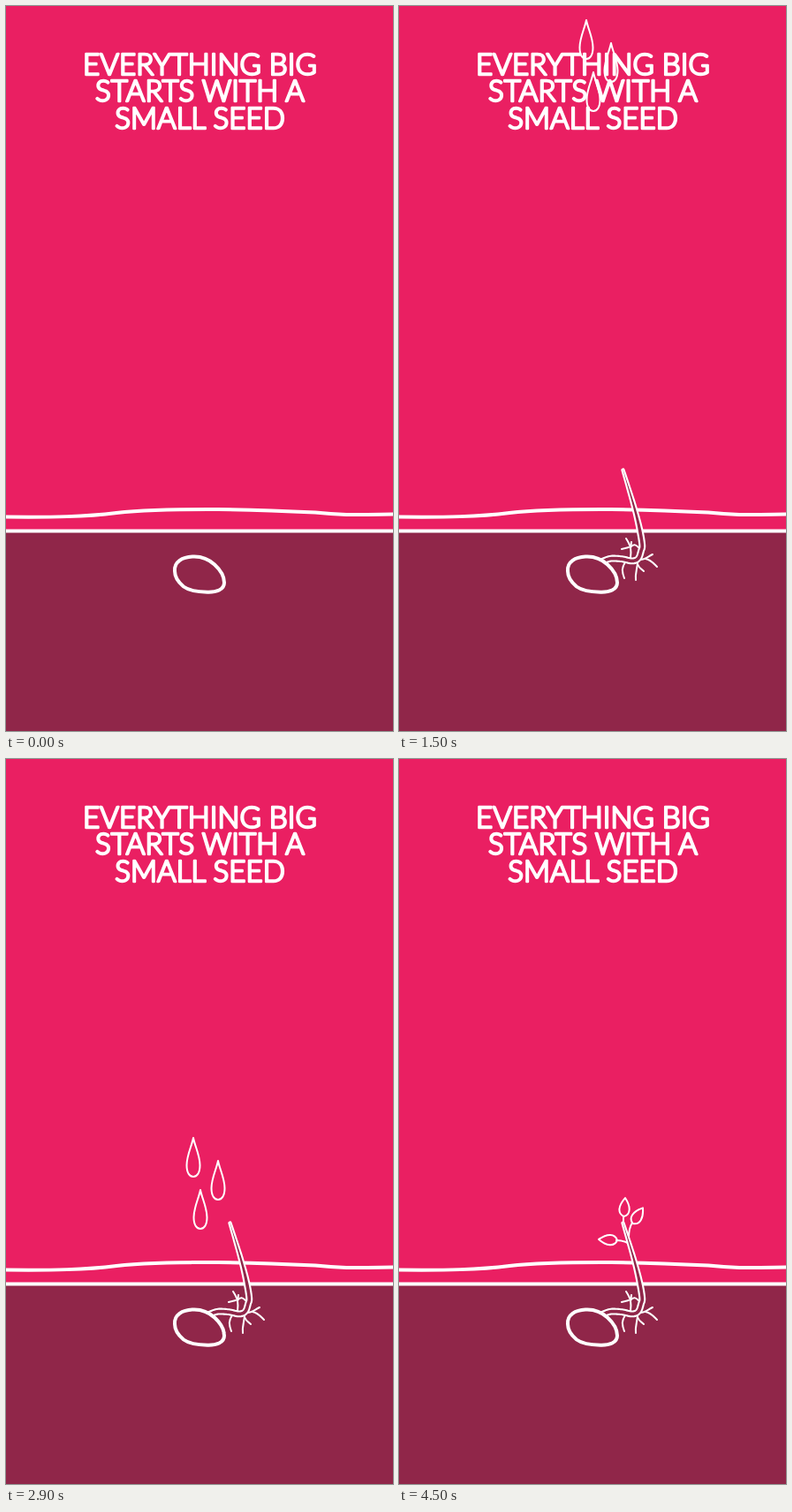
Recreate the animation shown at these times as an HTML page. Size 438 by 821 pixels, loop 4600 ms.

```html
<!DOCTYPE html>
<html lang="en">
<head>
<meta charset="utf-8">
<title>Small seed</title>
<style>
  html, body { margin: 0; width: 100%; height: 100%; overflow: hidden; background: #ea1f62; }
  svg { display: block; width: 100vw; height: 100vh; }
  .line { fill: none; stroke: #fff; stroke-linecap: round; stroke-linejoin: round; }
  .thick { stroke-width: 4; }
  .thin { stroke-width: 2; }
  text {
    font: 300 33px Lato, "Open Sans", sans-serif;
    letter-spacing: 0.1px;
    text-anchor: middle;
    fill: #fff; stroke: #fff; stroke-width: 2.5; stroke-linejoin: round;
  }
</style>
</head>
<body>
<svg viewBox="0 0 438 821" preserveAspectRatio="none">
  <defs>
    <path id="drop" d="M0 0C2 10 7.5 20 7.5 31C7.5 40 4 44 0 44C-4 44 -7.5 40 -7.5 31C-7.5 20 -2 10 0 0Z"/>
    <path id="leaf" vector-effect="non-scaling-stroke" d="M0 0C-8 -3 -7 -12 0 -21C7 -12 8 -3 0 0Z"/>
  </defs>
  <rect width="438" height="821" fill="#ea1f62"/>
  <g id="rain" class="line thin">
    <use href="#drop" x="212"/>
    <use href="#drop" x="240" y="26"/>
    <use href="#drop" x="220" y="59"/>
  </g>
  <text x="219.5" y="78">EVERYTHING BIG</text>
  <text x="219.5" y="108">STARTS WITH A</text>
  <text x="219.5" y="138.5">SMALL SEED</text>
  <path class="line thick" style="fill:#ea1f62" d="M-5 578.5C55 579 90 578.5 125 574C165 569.5 210 570 240 570C290 570.5 330 572.5 350 573.5C380 577 400 576 443 575.5V600H-5Z"/>
  <rect y="594" width="438" height="227" fill="#902649"/>
  <path class="line thick" d="M-5 594.4H443"/>
  <g id="roots" class="line thin"></g>
  <g id="twigs" class="line thin"></g>
  <path id="stem" class="line" stroke-width="2.1" style="fill:#902649"/>
  <g id="leaves" class="line thin"></g>
  <path class="line thick" style="fill:#902649" d="M191 640C190 629 200 624 211 623.5C220 623 229 626 236 632.5C242 638 247 646 247 653C247 661 238 664 228 663.7C217 663.5 207 662 201 657.5C195 652.5 191 647 191 640Z"/>
</svg>
<script>
const LOOP = 4600, STEP = 100;
const NS = "http://www.w3.org/2000/svg";
const byId = id => document.getElementById(id);
const progress = (t, a, b) => Math.min(1, Math.max(0, (t - a) / (b - a)));

function add(parent, tag, attrs) {
  const el = document.createElementNS(NS, tag);
  for (const k in attrs) el.setAttribute(k, attrs[k]);
  return byId(parent).appendChild(el);
}

// Lines that draw themselves: path, start, end
const strokes = [
  ["roots", "M262 625C263 617 263 612 257 603", 950, 1250],
  ["roots", "M260 613L252 615", 1050, 1300],
  ["roots", "M262 614L263 607", 1050, 1300],
  ["roots", "M262 613C266 608 269 611 271 613", 1050, 1300],
  ["roots", "M273 627C278 627 281 624 287 621", 1000, 1300],
  ["roots", "M279 626C285 627 288 631 292 635", 1050, 1350],
  ["roots", "M256 630C252 636 252 640 255 648", 950, 1250],
  ["roots", "M270 629C270 637 267 642 268 650", 950, 1250],
  ["roots", "M270 632C272 637 274 637 277 640", 1050, 1300],
  ["twigs", "M260 542C260 536 261 530 264 525", 3400, 3850],
  ["twigs", "M260 549C256 546 251 545 246 545", 3700, 3950],
  ["twigs", "M254 525V518", 3700, 3900]
].map(([group, d, from, to]) => ({
  el: add(group, "path", { d, pathLength: 1 }), from, to
}));

// Leaves: base x, base y, angle
const leaves = [[254.5, 518, 4], [264.5, 526, 33], [247, 545, -87]].map(([x, y, angle]) => ({
  el: add("leaves", "use", { href: "#leaf" }), x, y, angle
}));

// Centre of the stem as a smooth curve through a few points
const knots = [[228, 630], [239, 625.8], [252, 626.2], [264, 628.4], [270.8, 625.5], [274, 617],
  [275.2, 610], [272, 591], [266.3, 568], [259.5, 545], [253.5, 525.5]];

function spline(pts, n) {
  const out = [], at = i => pts[Math.min(pts.length - 1, Math.max(0, i))];
  for (let i = 0; i < pts.length - 1; i++) {
    const [a, b, c, d] = [at(i - 1), at(i), at(i + 1), at(i + 2)];
    for (let k = 0; k < n; k++) {
      const u = k / n;
      out.push([0, 1].map(j => b[j] + 0.5 * u * (c[j] - a[j] +
        u * (2 * a[j] - 5 * b[j] + 4 * c[j] - d[j] + u * (3 * (b[j] - c[j]) + d[j] - a[j])))));
    }
  }
  return out.concat([at(pts.length - 1)]);
}

const curve = spline(knots, 10);
const dist = [0];
for (let i = 1; i < curve.length; i++) {
  dist.push(dist[i - 1] + Math.hypot(curve[i][0] - curve[i - 1][0], curve[i][1] - curve[i - 1][1]));
}
const total = dist[dist.length - 1];
const bend = dist[60];

function stemPath(len) {
  const left = [], right = [];
  const tipHalf = 2.3 - 1.2 * progress(len, bend, total);
  let half = 0;
  for (let i = 0; i < curve.length && dist[i] <= len + 0.01; i++) {
    const p = curve[Math.max(0, i - 1)], q = curve[Math.min(curve.length - 1, i + 1)];
    const dx = q[0] - p[0], dy = q[1] - p[1], m = Math.hypot(dx, dy);
    half = tipHalf + (2.9 - tipHalf) * Math.min(1, (len - dist[i]) / 75);
    const ox = -dy / m * half, oy = dx / m * half, [x, y] = curve[i];
    left.unshift(`${(x + ox).toFixed(2)} ${(y + oy).toFixed(2)}`);
    right.push(`${(x - ox).toFixed(2)} ${(y - oy).toFixed(2)}`);
  }
  return `M${right.join("L")}A${half} ${half} 0 0 1 ${left.join("L")}`;
}

// Fall of the rain: time, height
const fall = [[900, -148], [1500, 16], [2300, 242], [2400, 268], [2900, 429], [3000, 457], [3500, 610]];

function rainY(t) {
  const i = Math.max(1, fall.findIndex(p => t <= p[0]));
  const [t0, y0] = fall[i - 1], [t1, y1] = fall[i];
  return y0 + (y1 - y0) * progress(t, t0, t1);
}

function draw(t) {
  const len = bend * progress(t, 0, 700) + (total - bend) * progress(t, 700, 1300);
  byId("stem").setAttribute("d", len > 5 ? stemPath(len) : "");

  for (const s of strokes) {
    const p = progress(t, s.from, s.to);
    s.el.style.display = p ? "" : "none";
    s.el.setAttribute("stroke-dasharray", p < 1 ? `${p} 2` : "none");
  }

  const size = progress(t, 3900, 4500);
  for (const l of leaves) {
    l.el.style.display = size ? "" : "none";
    l.el.setAttribute("transform", `translate(${l.x} ${l.y}) rotate(${l.angle}) scale(${size})`);
  }

  const wet = t > 900 && t < 3500;
  byId("rain").style.display = wet ? "" : "none";
  if (wet) byId("rain").setAttribute("transform", `translate(0 ${rainY(t)})`);
}

const start = performance.now();
function tick() {
  const t = (performance.now() - start) % LOOP;
  draw(Math.floor(t / STEP) * STEP);
  requestAnimationFrame(tick);
}
tick();
</script>
</body>
</html>
```
